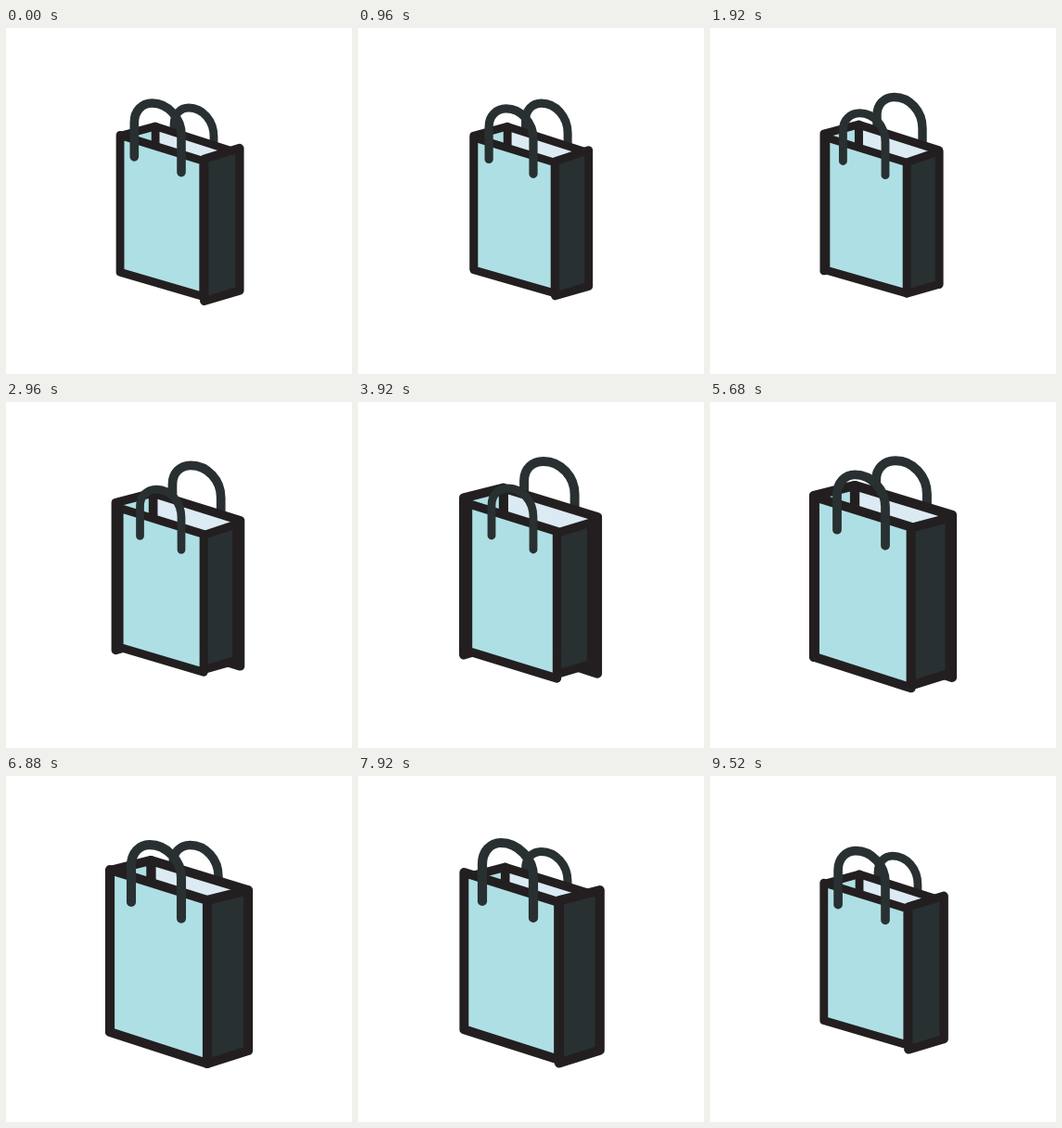
These frames come from a looping animation (373x373 px, 9600 ms). An HTML page:

```html
<!DOCTYPE html>
<html lang="en">
<head>
<meta charset="utf-8">
<title>Shopping bag</title>
<style>
  html, body { margin: 0; width: 100%; height: 100%; overflow: hidden; background: #fff; }
  svg { display: block; width: 100%; height: 100%; }
  path { stroke: #231f20; stroke-linecap: round; stroke-linejoin: round; }
  .handle { fill: none; stroke: #293031; }
  .inside { fill: #dbeaf3; }
  .face { fill: #aedfe4; }
  .side { fill: #293031; }
</style>
</head>
<body>
<svg viewBox="0 0 373 373">
  <path id="backHandle" class="handle"/>
  <path id="back" class="inside"/>
  <path id="left" class="face"/>
  <path id="side" class="side"/>
  <path id="front" class="face"/>
  <path id="frontHandle" class="handle"/>
</svg>
<script>
const LOOP = 9600, STEP = 80;
const times = [0, 1920, 3920, 5680, 6880, 7920];

// Each part swells between its small and large outline; "grow" is sampled at `times`.
const parts = {
  backHandle: {
    grow: [0, .5, .96, .99, .5, .2], width: [8.8, 10],
    small: [181, 135, 181, 104, 181, 93, 188, 86, 197, 86, 212, 86, 224, 100, 224, 117, 224, 145],
    large: [179, 125, 179, 84, 179, 71, 188, 63, 200, 63, 219, 63, 234, 80, 234, 99, 234, 140]
  },
  back: {
    grow: [0, .11, .82, 1, .93, .47], width: [8.6, 10.2],
    small: [161, 106, 245, 133, 245, 274, 161, 250],
    large: [156, 90, 261, 122, 261, 297, 156, 262]
  },
  left: {
    grow: [0, .13, .84, 1, .94, .48], width: [8.6, 10.2],
    small: [124.5, 116, 161, 106, 161, 250, 124.5, 260],
    large: [112, 101, 156, 90, 156, 262, 112, 275]
  },
  side: {
    grow: [.35, .01, .32, .82, 1, .98], width: [8.8, 10.2],
    small: [212, 145, 247, 133, 247, 276, 212, 286],
    large: [217, 134, 261, 123, 261, 296, 217, 310]
  },
  front: {
    grow: [.15, 0, .5, .93, 1, .82], width: [8.6, 10.2],
    small: [125, 118, 212, 145, 212, 286, 125, 261],
    large: [112, 101, 217, 134, 217, 310, 112, 276]
  },
  frontHandle: {
    grow: [.57, .06, 0, .7, .9, 1], width: [8.8, 10.2],
    small: [144, 144, 144, 111, 144, 100, 152, 93, 162, 93, 177, 93, 189, 107, 189, 124, 189, 159],
    large: [134, 135, 134, 95, 134, 81, 143, 72, 154, 72, 173, 72, 189, 90, 189, 108, 189, 153]
  }
};

const mix = (a, b, g) => a + (b - a) * g;

// Smooth periodic curve through the sampled values.
function curve(values, t) {
  const n = times.length;
  const at = k => times[(k + n) % n] + Math.floor(k / n) * LOOP;
  const val = k => values[(k + n) % n];
  const slope = k => (val(k + 1) - val(k - 1)) / (at(k + 1) - at(k - 1));
  let i = n - 1;
  while (times[i] > t) i--;
  const h = at(i + 1) - at(i), u = (t - at(i)) / h, v = 1 - u;
  return val(i) * (1 + 2 * u) * v * v + val(i + 1) * u * u * (3 - 2 * u)
       + h * u * v * (slope(i) * v - slope(i + 1) * u);
}

function outline(p) {
  const xy = p.map(n => n.toFixed(2));
  if (xy.length === 8) return `M${xy.join(" ")}Z`;
  return `M${xy.slice(0, 2)}L${xy.slice(2, 4)}C${xy.slice(4, 16)}L${xy.slice(16)}`;
}

function draw(t) {
  for (const [id, part] of Object.entries(parts)) {
    const g = curve(part.grow, t);
    const el = document.getElementById(id);
    el.setAttribute("d", outline(part.small.map((n, i) => mix(n, part.large[i], g))));
    el.setAttribute("stroke-width", mix(...part.width, g).toFixed(2));
  }
}

const start = performance.now();
function tick() {
  const t = (performance.now() - start) % LOOP;
  draw(Math.floor(t / STEP) * STEP);
  requestAnimationFrame(tick);
}
tick();
</script>
</body>
</html>
```
